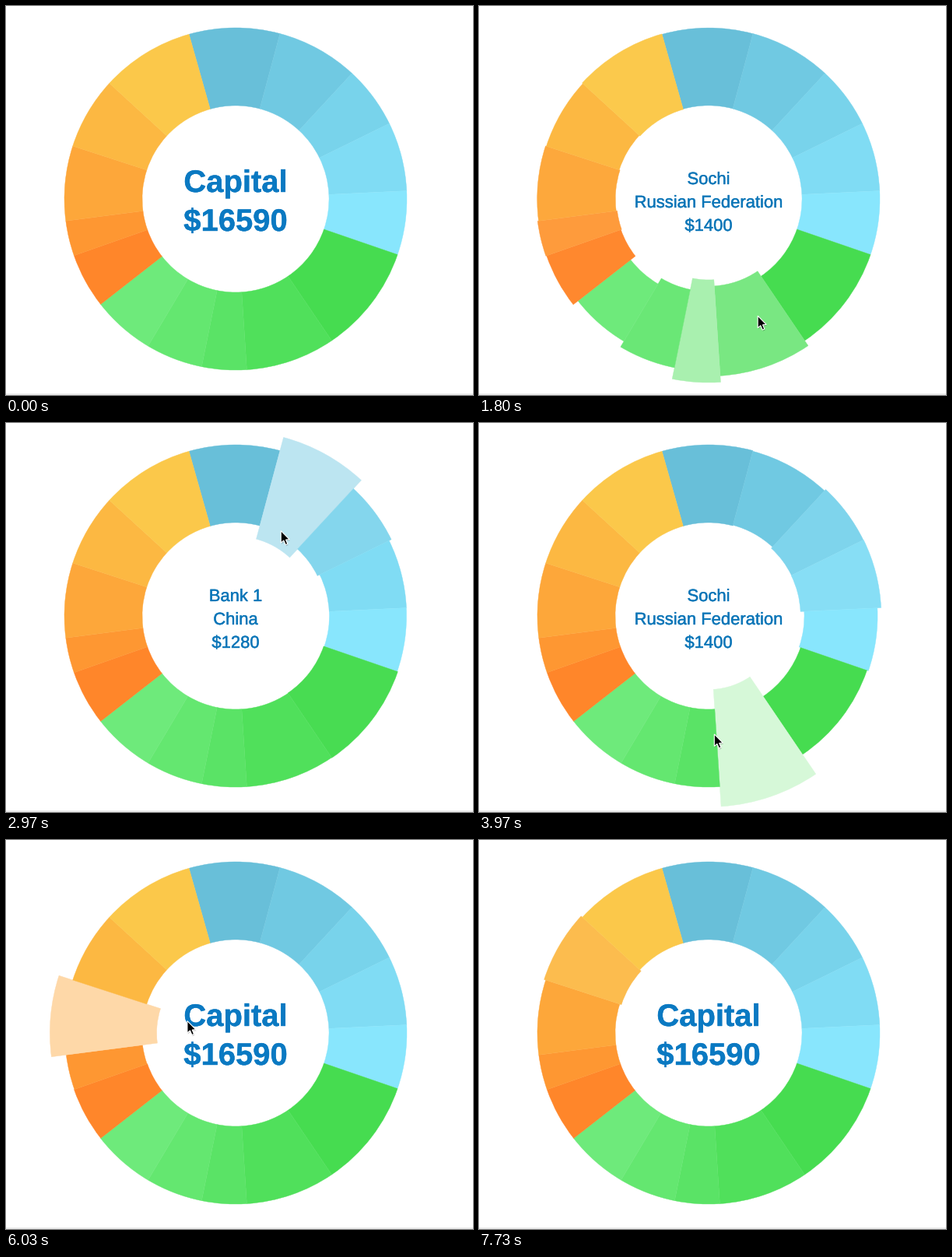
These frames come from a looping animation (600x500 px, 7.77 s). A matplotlib script:

```python
import numpy as np
import matplotlib.pyplot as plt
from matplotlib.animation import FuncAnimation
from matplotlib.colors import to_rgb
from matplotlib.patches import Polygon, Wedge
from matplotlib.patheffects import withStroke

plt.rcParams["text.hinting"] = "none"
plt.rcParams["text.hinting_factor"] = 1

W, H, DPI = 600, 500, 100
PX = 72 / DPI
STEP, FRAMES = 30, 259
CX, CY = 295, 248
INNER, OUTER = 120, 220
START = -15.8
HOVER_LAG = 40
GROW, FREQ, DAMP = 20, 15.7, 5.2   # spring target, rad/s, 1/s
FADE = 0.03                        # opacity lost per pixel of growth

# country, names, values, first and last colour
GROUPS = [
    ("China", ["Bank 2", "Bank 1", "Bank 3", "Bank 4", "Bank 5"],
     [1420, 1280, 970, 1080, 1000], "#68bfd9", "#88e6fd"),
    ("Russian Federation", ["Moscow", "Sochi", "Kazan", "Omsk", "Perm"],
     [1700, 1400, 700, 890, 980], "#46dc50", "#6eea7b"),
    ("Brazil", [f"Branch {n}" for n in range(1, 6)],
     [860, 550, 1170, 1130, 1460], "#ff862a", "#fbc84a"),
]
SLICES = [(name, country, value)
          for country, names, values, *_ in GROUPS
          for name, value in zip(names, values)]
COLORS = np.concatenate([np.linspace(to_rgb(a), to_rgb(b), 5)
                         for *_, a, b in GROUPS])
VALUES = [s[2] for s in SLICES]
TOTAL = sum(VALUES)
EDGES = START + 360 * np.cumsum([0] + VALUES) / TOTAL

# pointer: time in ms, distance from the centre, degrees clockwise from top
PATH = [
    (270, 315, 78), (600, 170, 20),
    (1800, 163, -202.8), (2520, 152, -318), (2970, 124, -332),   # round the ring
    (3340, 150, -318), (3760, 155, -214), (3970, 152, -181.2),   # and back
    (4200, 150, -146), (4700, 130, -128.5), (5170, 82, -126),    # into the hole
    (5930, 132, -82), (6030, 64, -76), (6700, 60, -62),
    (7150, 150, -60), (7420, 315, -69),                          # off the stage
]
TIMES, RADII, ANGLES = np.transpose(PATH)


def pointer(t):
    return np.interp(t, TIMES, RADII), np.interp(t, TIMES, ANGLES)


def hovered(t):
    """Index of the slice under the pointer, or None."""
    r, angle = pointer(t - HOVER_LAG)
    if not 104.5 < r < 232:
        return None
    angle = (angle - START) % 360 + START
    return int(np.searchsorted(EDGES, angle, side="right")) - 1


def simulate(substeps=10):
    """Spring offsets of all slices for every frame."""
    pos, vel = np.zeros((2, len(SLICES)))
    dt = STEP / substeps / 1000
    stiffness = FREQ ** 2 + DAMP ** 2
    track = []
    for i in range(FRAMES):
        track.append(pos.copy())
        for k in range(substeps):
            goal = np.zeros(len(SLICES))
            hit = hovered((i + k / substeps) * STEP)
            if hit is not None:
                goal[hit] = GROW
            vel += dt * (stiffness * (goal - pos) - 2 * DAMP * vel)
            pos += dt * vel
    return track


OFFSETS = simulate()

fig = plt.figure(figsize=(W / DPI, H / DPI), dpi=DPI, facecolor="white")
ax = fig.add_axes([0, 0, 1, 1])
ax.set_xlim(0, W)
ax.set_ylim(H, 0)
ax.axis("off")

ax.plot([0, W], [498.7, 498.7], color="#e4e4e4", lw=1.5 * PX)

wedges = [ax.add_patch(Wedge((CX, CY), OUTER, a - 90, b - 90,
                             width=OUTER - INNER, lw=0.4 * PX))
          for a, b in zip(EDGES[:-1], EDGES[1:])]


def label(y, size, color, weight="normal", text=""):
    return ax.text(CX, y, text, ha="center", va="baseline", color=color,
                   family="Liberation Sans", weight=weight,
                   fontsize=size * PX, zorder=5,
                   path_effects=[withStroke(linewidth=0.4 * PX, foreground=color)])


totals = [label(239, 40, "#0a79c2", "bold", "Capital"),
          label(289, 40, "#0a79c2", "bold", f"${TOTAL}")]
details = [label(y, 22, "#0b76b8") for y in (229, 259, 289)]

ARROW = np.array([(0, 0), (0, 15.5), (3.6, 12.4), (6, 18), (8.6, 16.9),
                  (6.3, 11.5), (11, 11.2)])
shadow = ax.add_patch(Polygon(ARROW, fc="black", ec="none", alpha=0.2, zorder=8))
arrow = ax.add_patch(Polygon(ARROW, fc="black", ec="white", lw=1.1 * PX, zorder=9))


def draw_slices(offsets):
    for wedge, base, off in zip(wedges, COLORS, offsets):
        opacity = 1 - FADE * max(off, 0)
        wedge.set_radius(OUTER + off)
        wedge.set_width(OUTER - INNER + 2 * off)
        wedge.set_color(1 - opacity * (1 - base))


def draw_text(hit):
    for text in totals:
        text.set_visible(hit is None)
    for text in details:
        text.set_visible(hit is not None)
    if hit is not None:
        name, country, value = SLICES[hit]
        for text, line in zip(details, (name, country, f"${value}")):
            text.set_text(line)


def draw_pointer(t):
    r, angle = pointer(t)
    angle = np.radians(angle)
    tip = ARROW + (CX + r * np.sin(angle), CY - r * np.cos(angle))
    arrow.set_xy(tip)
    shadow.set_xy(tip + (0.8, 1.6))
    for part in (arrow, shadow):
        part.set_visible(TIMES[0] <= t <= TIMES[-1])


def update(i):
    t = i * STEP
    draw_slices(OFFSETS[i])
    draw_text(hovered(t))
    draw_pointer(t)
    return [*wedges, *totals, *details, shadow, arrow]


anim = FuncAnimation(fig, update, frames=FRAMES, interval=STEP,
                     repeat=True, repeat_delay=0, blit=False)
plt.show()
```
